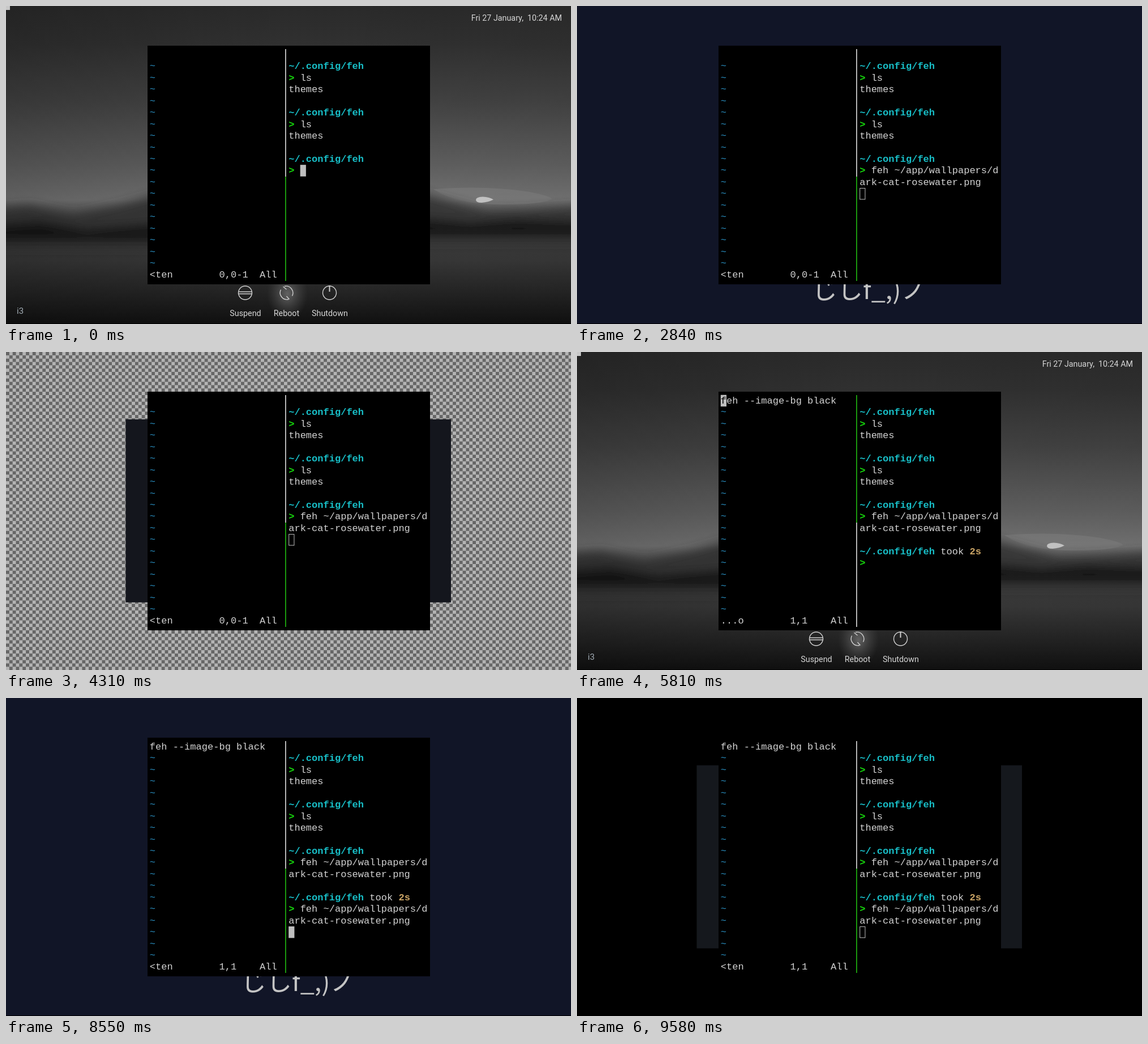
An HTML page that plays this animation: 998x561 px, repeating every 9840 ms.

```html
<!DOCTYPE html>
<html lang="en">
<head>
<meta charset="utf-8">
<title>Terminal image viewer</title>
<style>
html, body { margin: 0; width: 100%; height: 100%; overflow: hidden; background: #000; }
svg { display: block; width: 100vw; height: 100vh; }
text { white-space: pre; }
#term text { font: 17.04px "Liberation Mono", monospace; fill: #d3d3d3; }
#term .path { font-weight: 700; fill: #18bfc8; }
#term .mark { font-weight: 700; fill: #16d80c; }
#term .took { font-weight: 700; fill: #cba566; }
#term .tilde { fill: #2a90c2; }
#term .inv { fill: #000; }
#wall text { font: 14.3px Roboto, sans-serif; fill: #d6d6d6; }
#icons { fill: none; stroke: #cfcfcf; stroke-width: 1.4; }
#cat { font: 500 45px "Noto Sans CJK JP", "Noto Sans CJK", sans-serif; fill: #c4c4c4; }
</style>
</head>
<body>
<svg viewBox="0 0 998 561" preserveAspectRatio="none">
  <defs>
    <linearGradient id="sky" x2="0" y2="1">
      <stop offset="0" stop-color="#2a2a2a"/>
      <stop offset=".12" stop-color="#303030"/>
      <stop offset=".3" stop-color="#424242"/>
      <stop offset=".5" stop-color="#5f5f5f"/>
      <stop offset=".61" stop-color="#737373"/>
      <stop offset=".7" stop-color="#3a3a3a"/>
      <stop offset=".8" stop-color="#373737"/>
      <stop offset=".9" stop-color="#242424"/>
      <stop offset="1" stop-color="#101010"/>
    </linearGradient>
    <linearGradient id="shade">
      <stop offset="0" stop-opacity=".16"/>
      <stop offset=".5" stop-opacity="0"/>
      <stop offset="1" stop-opacity=".04"/>
    </linearGradient>
    <radialGradient id="glow">
      <stop offset="0" stop-color="#777" stop-opacity=".75"/>
      <stop offset="1" stop-color="#555" stop-opacity="0"/>
    </radialGradient>
    <filter id="soft" x="-20%" y="-60%" width="140%" height="220%"><feGaussianBlur stdDeviation="9"/></filter>
    <pattern id="checks" width="11.69" height="11.69" patternUnits="userSpaceOnUse">
      <path d="M0 0h11.69v11.69H0z" fill="#b4b4b4"/>
      <path d="M0 0h5.845v5.845H0zM5.845 5.845h5.845v5.845H5.845z" fill="#666"/>
    </pattern>
  </defs>

  <g id="wall">
    <path d="M0 0h998v561H0z" fill="url(#sky)"/>
    <path d="M755 323Q850 316 925 328Q965 336 964 341Q940 352 860 350Q790 347 755 323Z" fill="#7c7c7c" opacity=".7"/>
    <g filter="url(#soft)">
      <path d="M-60 362L40 352L120 368L200 352L270 332V425H-60Z" fill="#383838"/>
      <path d="M725 328L790 346L850 362L920 360L1060 350V415H725Z" fill="#383838"/>
      <path d="M-60 388L60 380L140 394L270 384V416H-60Z" fill="#131313"/>
      <path d="M725 374L820 382L900 376L1060 382V408H725Z" fill="#151515"/>
    </g>
    <path d="M830 342Q830 337 842 336.500Q854 337 861 341.500Q852 346 840 347Q830 347 830 342Z" fill="#c6c6c6"/>
    <path d="M0 0h998v561H0z" fill="url(#shade)"/>
    <ellipse cx="497" cy="508" rx="36" ry="46" fill="url(#glow)"/>
    <path d="M0 0h7v7H0z" fill="#c8c8c8"/>
    <text x="982" y="25.500" text-anchor="end">Fri 27 January,  10:24 AM</text>
    <text x="19" y="543" style="font-size:15px;fill:#a3adb5">i3</text>
    <g id="icons">
      <circle cx="422.500" cy="506" r="12"/>
      <path d="M410.500 504.300h24M410.500 507.700h24"/>
      <path d="M492 494.500A12 12 0 0 1 505.500 511.500M499 517.500A12 12 0 0 1 485.500 500.500M489.500 495l6 5M495.500 512l5 5.500"/>
      <circle cx="571.500" cy="506" r="12"/>
      <path d="M571.500 493v11" stroke-width="2"/>
    </g>
    <g text-anchor="middle">
      <text x="423" y="546.500">Suspend</text>
      <text x="495.500" y="546.500">Reboot</text>
      <text x="572" y="546.500">Shutdown</text>
    </g>
  </g>

  <g id="viewer">
    <rect id="back" width="998" height="561"/>
    <g id="image">
      <rect id="paper" width="998" height="561"/>
      <text id="cat" x="415" y="517">じしf_,)ノ</text>
    </g>
  </g>
  <path id="edge" d="M0 560h998v1H0z"/>
  <path d="M250 70h499v421H250z"/>
  <g id="term"></g>
</svg>
<script>
const LOOP = 9840;
const CELL_W = 10.225, CELL_H = 20.45, LEFT = 253.8, TOP = 75.7;
const SPLIT = 24, COLS = 24;
const NATIVE = 1920 / 1366;
const FEH = 'feh ~/app/wallpapers/dark-cat-rosewater.png';
const $ = id => document.getElementById(id);

const start = {
  cmd: '', rerun: '', took: false, buffer: '', status: '<ten', ruler: '0,0-1',
  left: false, cursor: [10, 2], style: 'solid', zoom: -1, back: 'url(#checks)', tone: '#14161d'
};

// Each entry changes part of the state from its time on.
const steps = [
  [540, { cmd: 'ls', cursor: [10, 4] }],
  [1200, { cmd: 'cd ~/.config/feh', cursor: [10, 18] }],
  [1850, { style: 'none' }],
  [2210, { cmd: FEH, cursor: [11, 21], style: 'solid' }],
  [2740, { cursor: [12, 0] }],
  [2790, { zoom: 0 }],
  [2840, { style: 'hollow' }],
  [3790, { zoom: 1 }],
  [3980, { zoom: 2 }],
  [4170, { zoom: 3 }],
  [4310, { zoom: 4 }],
  [4720, { zoom: -1, took: true, cursor: [14, 2] }],
  [4760, { style: 'solid' }],
  [5220, { style: 'none' }],
  [5270, { style: 'solid' }],
  [5410, { left: true, cursor: [0, 0] }],
  [5810, { buffer: 'feh --image-bg black', status: '...o', ruler: '1,1' }],
  [6310, { status: ':', ruler: '', cursor: [19, 1] }],
  [6620, { status: ':w', cursor: [19, 2] }],
  [7150, { status: '<ten', ruler: '1,1', cursor: [0, 0] }],
  [7580, { left: false, cursor: [14, 2] }],
  [8140, { rerun: FEH, cursor: [15, 21] }],
  [8500, { cursor: [16, 0] }],
  [8550, { zoom: 0, back: '#000', tone: '#15181d' }],
  [8600, { style: 'hollow' }],
  [9010, { zoom: 1 }],
  [9230, { zoom: 2 }],
  [9350, { zoom: 3 }],
  [9580, { zoom: 4 }]
];

const colX = col => LEFT + col * CELL_W;
const rowY = row => TOP + row * CELL_H;
const escape = s => s.replace(/</g, '&lt;').replace(/>/g, '&gt;');

function put(row, col, str, kind = '') {
  return `<text class="${kind}" x="${colX(col)}" y="${rowY(row) + 15.2}">${escape(str)}</text>`;
}

function prompt(row, cmd) {
  const first = cmd.slice(0, COLS - 2), rest = cmd.slice(COLS - 2);
  return put(row, SPLIT, '~/.config/feh', 'path') + put(row + 1, SPLIT, '>', 'mark') +
    put(row + 1, SPLIT + 2, first) + put(row + 2, SPLIT, rest);
}

function cursor(s) {
  if (s.style === 'none') return '';
  const [row, col] = s.cursor;
  const x = colX(col + (s.left ? 0 : SPLIT)), y = rowY(row);
  if (s.style === 'hollow') {
    return `<rect x="${x + .5}" y="${y + .5}" width="${CELL_W - 1}" height="${CELL_H - 1}" fill="none" stroke="#bfbfbf"/>`;
  }
  const block = `<rect x="${x}" y="${y}" width="${CELL_W}" height="${CELL_H}" fill="#bfbfbf"/>`;
  return block + (s.left && row === 0 ? put(0, 0, s.buffer.slice(0, 1), 'inv') : '');
}

function divider(s) {
  const part = (y, h, on) =>
    `<rect x="493" y="${y}" width="1.8" height="${h}" fill="${on ? '#1da80f' : '#c8c8c8'}"/>`;
  return part(76, 225, s.left) + part(301, 184, !s.left);
}

function terminal(s) {
  let out = divider(s) + put(0, 0, s.buffer);
  for (let row = 1; row < 19; row++) out += put(row, 0, '~', 'tilde');
  out += put(19, 0, s.status);
  if (s.ruler) out += put(19, 12, s.ruler) + put(19, 19, 'All');
  for (const row of [1, 5]) out += prompt(row, 'ls') + put(row + 2, SPLIT, 'themes');
  out += prompt(9, s.cmd);
  if (s.took) {
    out += prompt(13, s.rerun) + put(13, SPLIT + 14, 'took') + put(13, SPLIT + 19, '2s', 'took');
  }
  return out + cursor(s);
}

function draw(s) {
  const open = s.zoom >= 0, filled = s.zoom < 2;
  $('wall').style.display = open ? 'none' : '';
  $('viewer').style.display = open ? '' : 'none';
  $('edge').style.display = filled ? '' : 'none';
  if (open) {
    const shrink = 0.8 ** s.zoom, k = NATIVE * shrink;
    const w = 998 * k, h = 561 * k;
    $('back').setAttribute('fill', s.back);
    const box = { x: 498.7 - w / 2, y: 280.2 - h / 2, width: w, height: h, fill: filled ? '#111527' : s.tone };
    for (const key in box) $('paper').setAttribute(key, box[key]);
    $('cat').setAttribute('transform', `translate(498.7 280.2) scale(${shrink}) translate(-498.7 -280.2)`);
  }
  $('term').innerHTML = terminal(s);
}

let shown = -1;
function frame(now) {
  const t = now % LOOP;
  const count = steps.filter(([at]) => at <= t).length;
  if (count !== shown) {
    shown = count;
    draw(Object.assign({}, start, ...steps.slice(0, count).map(([, change]) => change)));
  }
}

const origin = performance.now();
function tick() {
  frame(performance.now() - origin);
  requestAnimationFrame(tick);
}
tick();
</script>
</body>
</html>
```
